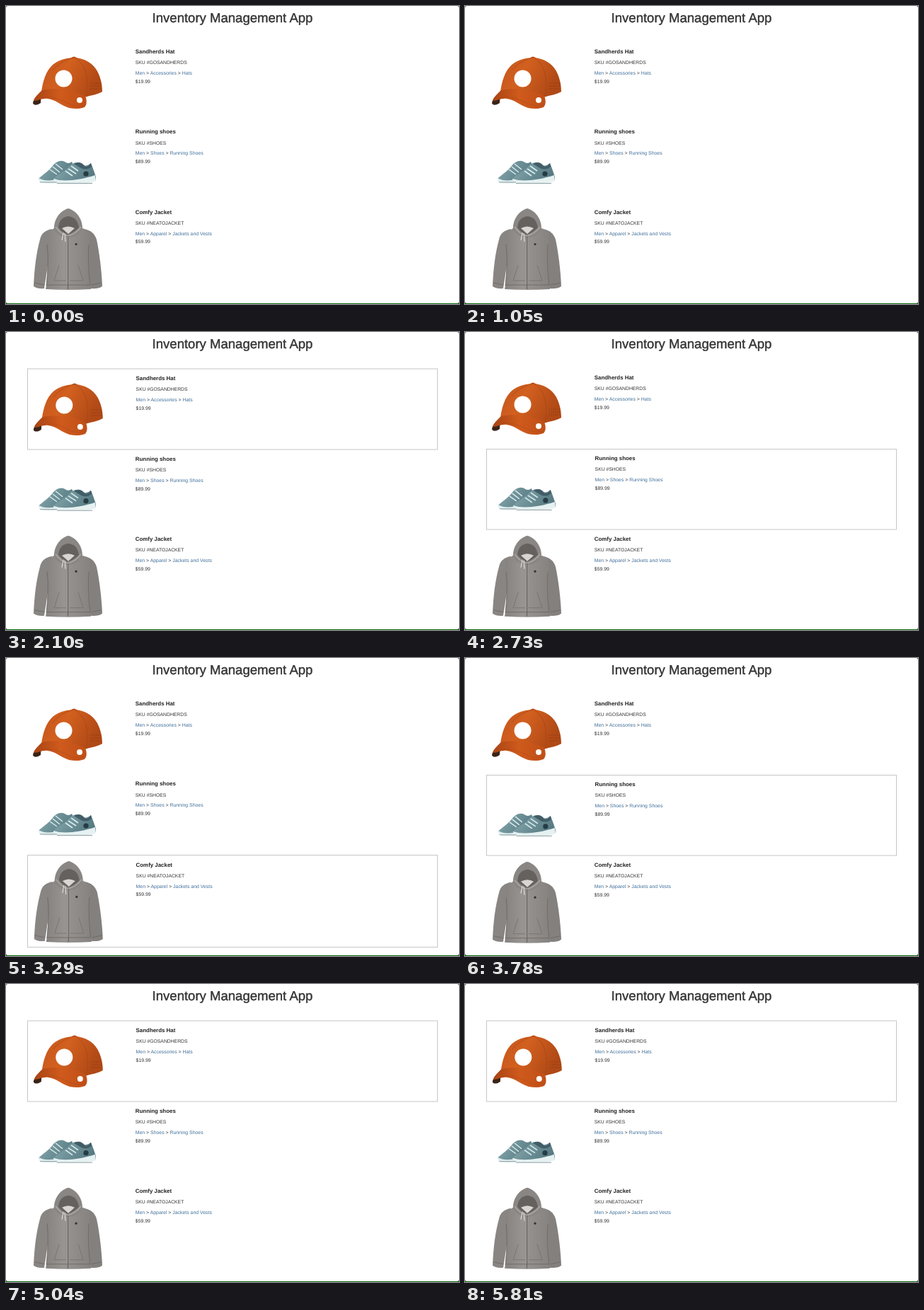
An HTML page for the animation above (5880 ms loop, 640 px wide and 421 px high).

```html
<!DOCTYPE html>
<html lang="en">
<head>
<meta charset="utf-8">
<title>Inventory Management App</title>
<style>
  html, body { margin: 0; width: 100%; height: 100%; overflow: hidden; background: #fff; }
  svg { display: block; width: 640px; height: 421px; }
  text { font-family: "Liberation Sans", Arial, sans-serif; font-size: 6.9px; fill: #333; text-rendering: geometricPrecision; }
  .title { font-size: 18.56px; text-anchor: middle; stroke: #333; stroke-width: .4px; }
  .name { font-size: 7.9px; font-weight: bold; fill: #222; }
  .sku { font-size: 6.8px; }
  .link { fill: #41709c; }
  .frame { fill: none; stroke: #c6c6c6; visibility: hidden; }
</style>
</head>
<body>
<svg viewBox="0 0 640 421">
  <defs>
    <linearGradient id="crown" x1="0" x2="1" y1="0" y2=".35">
      <stop offset="0" stop-color="#c4541c"/><stop offset=".45" stop-color="#d2601f"/><stop offset="1" stop-color="#b04916"/>
    </linearGradient>
    <linearGradient id="brim" x1="0" x2="1">
      <stop offset="0" stop-color="#a84414"/><stop offset=".5" stop-color="#cf5a1c"/><stop offset="1" stop-color="#c04f17"/>
    </linearGradient>
    <linearGradient id="knit" x1="0" x2="1" y1="0" y2=".4">
      <stop offset="0" stop-color="#8aa9af"/><stop offset=".5" stop-color="#6f9299"/><stop offset="1" stop-color="#587b83"/>
    </linearGradient>
    <linearGradient id="fleece" x1="0" x2="1">
      <stop offset="0" stop-color="#86827f"/><stop offset=".4" stop-color="#989491"/><stop offset="1" stop-color="#868280"/>
    </linearGradient>
  </defs>

  <rect width="640" height="421" fill="#fff"/>
  <text class="title" x="320" y="23.2">Inventory Management App</text>

  <g id="hat">
    <path d="M91 74Q96 69 101 74Z" fill="#b64b17"/>
    <path d="M50 121C52 107 56 92 66 83C76 75 88 73 97 73C111 74 122 80 129 92C134 102 136 111 136 121C130 125 120 126 111 129C94 120 68 116 50 121Z" fill="url(#crown)"/>
    <path d="M97 73C112 81 118 102 113 128M96 73C80 77 72 84 66 91" fill="none" stroke="#a84616" stroke-width=".7"/>
    <path d="M119 109H134M119.500 113H135M119 117H135" stroke="#83340e" stroke-width="1" stroke-dasharray="1 1.700"/>
    <path d="M50 120C45 126 39 131 38 137C39 141 45 140 49 137Z" fill="#3b2318"/>
    <path d="M51 119C46 124 40 129 39 134C46 134 51 130 59 131C70 132 77 140 89 144C98 146 106 145 111 143C115 139 114 132 112 127C94 118 70 115 51 119Z" fill="url(#brim)"/>
    <path d="M45 131C60 124 77 132 91 139Q102 143 111 139" fill="none" stroke="#b04a18" stroke-width=".6"/>
    <circle cx="81.500" cy="102.500" r="12" fill="#fff"/>
    <circle cx="104" cy="133" r="4" fill="#fff"/>
  </g>

  <g id="shoes">
    <path d="M46 244C51 239 59 234 65 227C70 220 77 217 83 220Q88 224 93 220L98 231L75 248C64 250 52 249 46 244Z" fill="url(#knit)"/>
    <path d="M46 243C54 248 65 247 76 244L73 250C63 251 51 251 47 248Z" fill="#e1eef0"/>
    <path d="M62 231L72 238M66 227L76 235M70 223L80 231" stroke="#dcecee" stroke-width="1.400"/>
    <path d="M67 245C70 239 79 236 87 229C92 223 99 219 105 222Q112 229 120 222C123 229 125 236 127 241V246Q98 251 68 247Z" fill="url(#knit)"/>
    <path d="M96 223Q105 218 111 226Q115 229 120 222L121 227Q114 233 106 229Z" fill="#425d67"/>
    <path d="M67 244C81 249 104 246 126 239L127 247Q121 250 109 250H73Q67 249 67 244Z" fill="#e6f1f2"/>
    <path d="M48 249H72M72 250.500H122" stroke="#819296" stroke-width=".9"/>
    <path d="M84 233L94 240M88 230L99 237M92 226L102 233" stroke="#d8edef" stroke-width="1.600"/>
    <circle cx="113" cy="237" r="3.600" fill="#253c45"/>
  </g>

  <g id="jacket">
    <path d="M65 315C55 317 50 321 48 330C43 348 40 370 39 396Q45 400 54 399L61 354Z" fill="#898582"/>
    <path d="M110 315C120 317 125 321 128 330C132 349 135 373 136 396Q130 400 120 399L114 354Z" fill="#83807d"/>
    <path d="M68 314Q88 328 109 314L119 321Q116 355 120 396V400Q88 402 56 400L57 394Q61 355 57 321Z" fill="url(#fleece)"/>
    <path d="M68 317C67 304 74 290 88 286C102 290 109 304 108 317Q98 328 88 327Q76 327 68 317Z" fill="#8a8683"/>
    <path d="M74 313C75 302 81 298 88 297C96 298 101 302 103 313Q96 320 88 323Q80 321 74 313Z" fill="#65615f"/>
    <path d="M79 314Q88 309 97 314L88 322Z" fill="#d8d5d2"/>
    <path d="M70 312Q78 323 87 325Q99 322 106 312" fill="none" stroke="#aaa6a2" stroke-width="1.500"/>
    <path d="M58 337Q61 360 57 395M117 337Q115 362 119 395M57 394H119M40 391L54 394M121 394L135 391" fill="none" stroke="#696663" stroke-width=".8"/>
    <path d="M87.500 325V400" stroke="#625f5d" stroke-width="1.100"/>
    <path d="M86.400 326V394" stroke="#b2aeaa" stroke-width=".5"/>
    <path d="M75 366L68 388H85M102 366L109 388H90" fill="none" stroke="#74706d" stroke-width=".8"/>
    <path d="M81 320L79 331M83 321L84 333" stroke="#eeeae6" stroke-width="1"/>
    <circle cx="99" cy="336.500" r="1.600" fill="#30333b"/>
  </g>

  <rect y="420" width="640" height="1" fill="#08680b"/>
  <path d="M0 0H2L0 2ZM640 0H638L640 2ZM0 420V418L2 420ZM640 420V418L638 420Z" fill="#777"/>
</svg>
<script>
  const LOOP = 5880;
  const NS = "http://www.w3.org/2000/svg";
  const items = [
    { id: "hat", name: "Sandherds Hat", sku: "GOSANDHERDS", path: ["Men", "Accessories", "Hats"], price: "$19.99", top: 52, height: 114 },
    { id: "shoes", name: "Running shoes", sku: "SHOES", path: ["Men", "Shoes", "Running Shoes"], price: "$89.99", top: 165.5, height: 113.5 },
    { id: "jacket", name: "Comfy Jacket", sku: "NEATOJACKET", path: ["Men", "Apparel", "Jackets and Vests"], price: "$59.99", top: 278.5, height: 130 }
  ];
  // Start time and hovered row; -1 means none
  const steps = [[0, -1], [1470, 0], [2240, 1], [2870, 2], [3430, 1], [3990, 0]];
  const svg = document.querySelector("svg");

  function add(parent, tag, attrs, content = "") {
    const el = document.createElementNS(NS, tag);
    for (const key in attrs) el.setAttribute(key, attrs[key]);
    el.textContent = content;
    return parent.appendChild(el);
  }

  items.forEach((item, i) => {
    const y = i * 113.3;
    const row = item.row = document.getElementById(item.id);
    const line = (cls, base, content) => add(row, "text", { class: cls, x: 182.8, y: base + y }, content);
    line("name", 67.1, item.name);
    line("sku", 82.2, "SKU #" + item.sku);
    const crumbs = line("crumbs", 97.1, "");
    item.path.forEach((part, n) => {
      if (n) add(crumbs, "tspan", {}, " > ");
      add(crumbs, "tspan", { class: "link" }, part);
    });
    line("price", 108.7, item.price);
    item.frame = add(svg, "rect", { class: "frame", x: 30.5, y: item.top, width: 579, height: item.height });
  });

  let shown;
  function hover(active) {
    if (active === shown) return;
    shown = active;
    items.forEach(({ row, frame }, i) => {
      const on = i === active;
      const dx = on ? .8 : 0;
      const dy = on ? .9 : active >= 0 && i > active ? 1.7 : 0;
      row.setAttribute("transform", `translate(${dx} ${dy})`);
      frame.style.visibility = on ? "visible" : "hidden";
    });
  }

  const start = performance.now();
  function draw() {
    const t = (performance.now() - start) % LOOP;
    hover(steps.filter(([at]) => at <= t).pop()[1]);
    requestAnimationFrame(draw);
  }
  draw();
</script>
</body>
</html>
```
